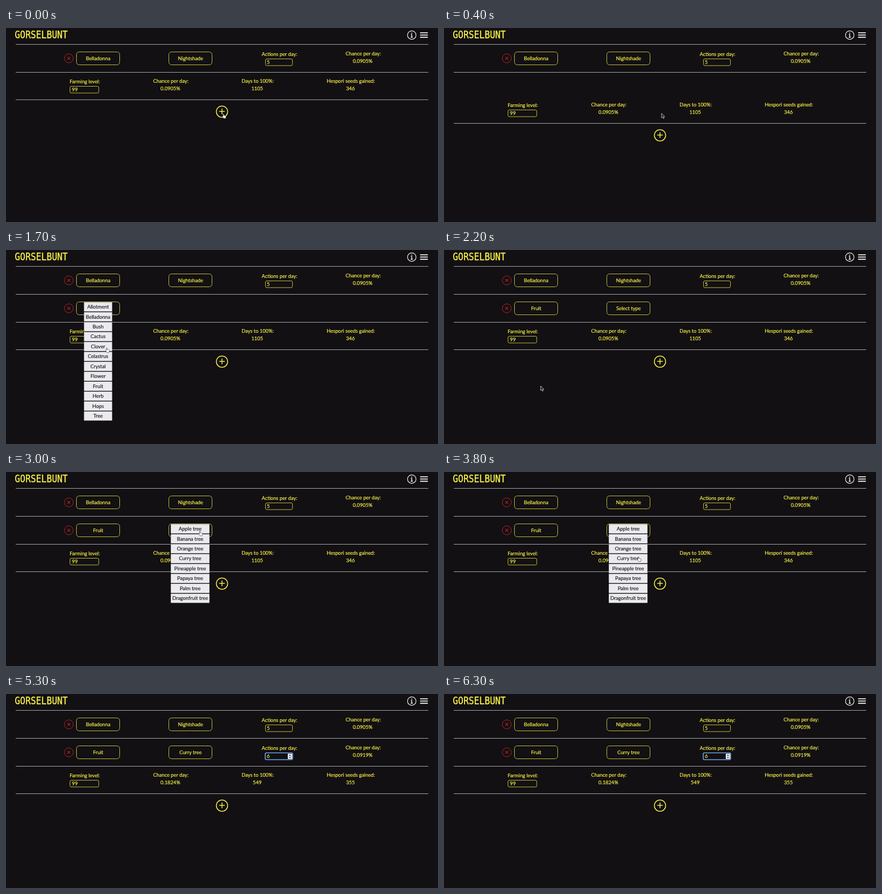
An HTML page for the animation above (6.4 s loop, 800x361 px).

```html
<!DOCTYPE html>
<html lang="en">
<head>
<meta charset="utf-8">
<title>Gorselbunt</title>
<style>
  html, body { margin: 0; width: 100%; height: 100%; overflow: hidden; background: #121013; }
  svg { display: block; width: 100%; height: 100%; }
  text { font: 9.3px Lato, sans-serif; fill: #fdf548; stroke: #fdf548; stroke-width: .18; text-anchor: middle; }
  .left { text-anchor: start; }
  .title { font: 16.3px "DejaVu Sans Mono", monospace; stroke-width: .3; text-anchor: start; }
  .box { fill: none; stroke: #c4be3c; stroke-width: 1; }
  .plus { fill: none; stroke: #f6ee46; stroke-width: 1.5; }
  .rule { stroke: #a9a8aa; stroke-width: 1; }
  .red { fill: none; stroke: #b82422; stroke-width: 1; }
  .icon { fill: none; stroke: #f0f0f0; }
  .item { fill: #ebeaee; }
  .dark { fill: #1b1a1c; stroke: #1b1a1c; }
</style>
</head>
<body>
<svg id="stage" viewBox="0 0 800 361" preserveAspectRatio="none"></svg>
<script>
const LOOP = 6400, STEP = 100, ROW = 52;
const stage = document.getElementById('stage');

function add(parent, tag, attrs = {}, content) {
  const node = document.createElementNS('http://www.w3.org/2000/svg', tag);
  for (const key in attrs) node.setAttribute(key, attrs[key]);
  if (content !== undefined) node.textContent = content;
  parent.appendChild(node);
  return node;
}
const group = parent => add(parent, 'g');
const label = (parent, x, y, str, cls = '') => add(parent, 'text', { x, y, class: cls }, str);
const box = (parent, x, y, width, height, rx) => add(parent, 'rect', { x, y, width, height, rx, class: 'box' });
const rule = (parent, y) => add(parent, 'line', { x1: 18, x2: 782, y1: y, y2: y, class: 'rule' });
const show = (node, on) => node.setAttribute('visibility', on ? 'visible' : 'hidden');
const setText = (node, str) => { if (node.textContent !== str) node.textContent = str; };
const clamp = v => Math.max(0, Math.min(1, v));
const smooth = v => v * v * (3 - 2 * v);

function button(parent, x, str) {
  box(parent, x, 44.5, 80, 24, 5);
  return label(parent, x + 40.2, 59.8, str);
}

function stats(parent, chance) {
  label(parent, 506.4, 52, 'Actions per day:');
  label(parent, 661.5, 51, 'Chance per day:');
  return label(parent, 660.5, 65.3, chance);
}

// One crop row, laid out as the first row
function cropRow(parent, crop, type, chance) {
  const row = group(parent);
  add(row, 'circle', { cx: 116.3, cy: 56.5, r: 8.3, class: 'red' });
  add(row, 'path', { d: 'M113.6 53.8l5.4 5.4m0-5.4l-5.4 5.4', class: 'red', style: 'stroke-width:1.2' });
  const cropText = button(row, 130.5, crop);
  const typePart = group(row);
  const typeText = button(typePart, 301.5, type);
  const statPart = group(row);
  const chanceText = stats(statPart, chance);
  rule(row, 82.5);
  return { row, cropText, typePart, typeText, statPart, chanceText };
}

function dropdown(cx, width, names) {
  const list = group(stage), pitch = 18.46;
  add(list, 'rect', { x: cx - width / 2, y: 97, width, height: pitch * names.length - .8, fill: '#1b1a1c' });
  names.forEach((name, i) => {
    const y = 97.3 + i * pitch;
    add(list, 'rect', { x: cx - width / 2, y, width, height: 17, class: 'item' });
    label(list, cx, y + 11.8, name, 'dark');
  });
  return list;
}

// Header
add(stage, 'rect', { width: 800, height: 361, fill: '#121013' });
add(stage, 'text', { class: 'title', transform: 'translate(16.3 19.3) scale(1 1.24)' }, 'GORSELBUNT');
add(stage, 'circle', { cx: 751.4, cy: 13.2, r: 7.9, class: 'icon', 'stroke-width': 1.2 });
add(stage, 'path', { d: 'M751.4 8.4v2M749.7 12.3h1.7v5M749.4 17.2h4', class: 'icon', 'stroke-width': 1.5 });
add(stage, 'path', { d: 'M766.8 8.9h14.4m-14.4 4.2h14.4m-14.4 4.2h14.4', class: 'icon', 'stroke-width': 1.9 });
rule(stage, 30.5);

// Crop rows
const first = cropRow(stage, 'Belladonna', 'Nightshade', '0.0905%');
box(first.row, 480.5, 57.5, 50, 12.5, 2.5);
label(first.row, 483, 67.2, '5', 'left');

const second = cropRow(stage, 'Select crop', 'Select type', '0.0000%');
second.row.setAttribute('transform', `translate(0 ${ROW})`);
const field = second.statPart;
add(field, 'rect', { x: 480, y: 57.5, width: 50.8, height: 12.8, rx: 2.5, fill: '#121013', stroke: '#6ea5ee', 'stroke-width': 1.6 });
add(field, 'rect', { x: 521.8, y: 59, width: 8, height: 10, rx: 1, fill: '#efefef' });
add(field, 'path', { d: 'M523.8 63l2-2.4 2 2.4zM523.8 65.2l2 2.4 2-2.4z', fill: '#333' });
const amount = label(field, 483, 67.2, '', 'left');
const caret = add(field, 'rect', { y: 59.2, width: .9, height: 9.8, fill: '#c8c8c8' });

// Totals
const totals = group(stage);
label(totals, 145.9, 103, 'Farming level:');
box(totals, 118.5, 108.5, 53.3, 12.5, 2.5);
label(totals, 122, 118.2, '99', 'left');
function total(x, name) {
  label(totals, x + .8, 102.1, name);
  return label(totals, x, 116.3, '');
}
const chance = total(304.4, 'Chance per day:');
const days = total(465.2, 'Days to 100%:');
const seeds = total(637.8, 'Hespori seeds gained:');
rule(totals, 133.5);
add(totals, 'circle', { cx: 400, cy: 155.7, r: 10.5, class: 'plus' });
add(totals, 'path', { d: 'M394.8 155.2h10.4m-5.2-5.2v10.4', class: 'plus' });

// Dropdowns
const cropList = dropdown(170.5, 52, ['Allotment', 'Belladonna', 'Bush', 'Cactus', 'Clover', 'Celastrus',
  'Crystal', 'Flower', 'Fruit', 'Herb', 'Hops', 'Tree']);
const typeList = dropdown(341, 71.5, ['Apple tree', 'Banana tree', 'Orange tree', 'Curry tree',
  'Pineapple tree', 'Papaya tree', 'Palm tree', 'Dragonfruit tree']);

// Pointer, tip at 0,0
const pointer = group(stage);
const arrow = add(pointer, 'path', { d: 'M0 0v8.4l1.9-1.7 1.5 3 1.4-.7-1.4-2.9h2.5z', fill: '#151515', stroke: '#e4e4e4', 'stroke-width': .8 });
const hand = add(pointer, 'path', {
  d: 'M-.7.4q.7-.9 1.4 0v2.8q.8-.6 1.5.2.8-.5 1.5.4 1-.3 1.2.8v2l-.8 2.2h-3.7l-2.5-3.6q.2-.9 1.4-.2z',
  fill: '#fff', stroke: '#222', 'stroke-width': .6
});

// Times of the clicks and the key press
const T = { add: 100, openCrop: 1300, pickCrop: 2200, openType: 2900, pickType: 3900, type: 4800 };
// time, x, y
const path = [
  [0, 402.5, 159.4], [600, 403, 158.6], [1200, 194, 111], [1400, 194, 111], [2000, 179, 253],
  [2300, 179, 253], [2800, 359, 110], [3100, 359, 110], [3600, 360, 157.6], [3900, 360, 157.6],
  [4300, 409, 157.6], [LOOP, 409, 157.6]
];

function pointerAt(t) {
  const i = path.findIndex((p, n) => n > 0 && t <= p[0]);
  const [t0, x0, y0] = path[i - 1], [t1, x1, y1] = path[i];
  const k = smooth((t - t0) / (t1 - t0));
  return [x0 + (x1 - x0) * k, y0 + (y1 - y0) * k];
}

function draw(t) {
  const between = (a, b) => t >= a && t < b;
  const shift = ROW * (1 - Math.pow(1 - clamp((t - T.add) / 500), 2.04));
  totals.setAttribute('transform', `translate(0 ${shift.toFixed(2)})`);

  second.row.setAttribute('opacity', clamp((t - 400) / 400));
  setText(second.cropText, t < T.pickCrop ? 'Select crop' : 'Fruit');
  setText(second.typeText, t < T.pickType ? 'Select type' : 'Curry tree');
  show(second.typePart, t >= T.pickCrop);
  show(second.statPart, t >= T.pickType);

  const typed = t >= T.type;
  setText(amount, typed ? '6' : '');
  setText(second.chanceText, typed ? '0.0919%' : '0.0000%');
  setText(chance, typed ? '0.1824%' : '0.0905%');
  setText(days, typed ? '549' : '1105');
  setText(seeds, typed ? '355' : '346');
  const since = t - (typed ? T.type : T.pickType);
  caret.setAttribute('x', typed ? 489 : 483);
  show(caret, since >= 0 && since % 1000 <= 500 - (typed ? STEP : 0));

  const cropOpen = between(T.openCrop, T.pickCrop), typeOpen = between(T.openType, T.pickType);
  show(cropList, cropOpen);
  show(typeList, typeOpen);

  const [x, y] = pointerAt(t);
  const inButton = left => x > left && x < left + 80 && y > 97 && y < 121;
  const hot = cropOpen || typeOpen || Math.hypot(x - 400, y - 156 - shift) < 11 ||
    (t >= 700 && inButton(130.5)) || (t >= T.pickCrop && inButton(301.5));
  pointer.setAttribute('transform', `translate(${x.toFixed(2)} ${y.toFixed(2)})`);
  show(arrow, !typed && !hot);
  show(hand, !typed && hot);
}

const start = performance.now();
function tick() {
  const t = (performance.now() - start) % LOOP;
  draw(Math.floor(t / STEP) * STEP);
  requestAnimationFrame(tick);
}
draw(0);
requestAnimationFrame(tick);
</script>
</body>
</html>
```
